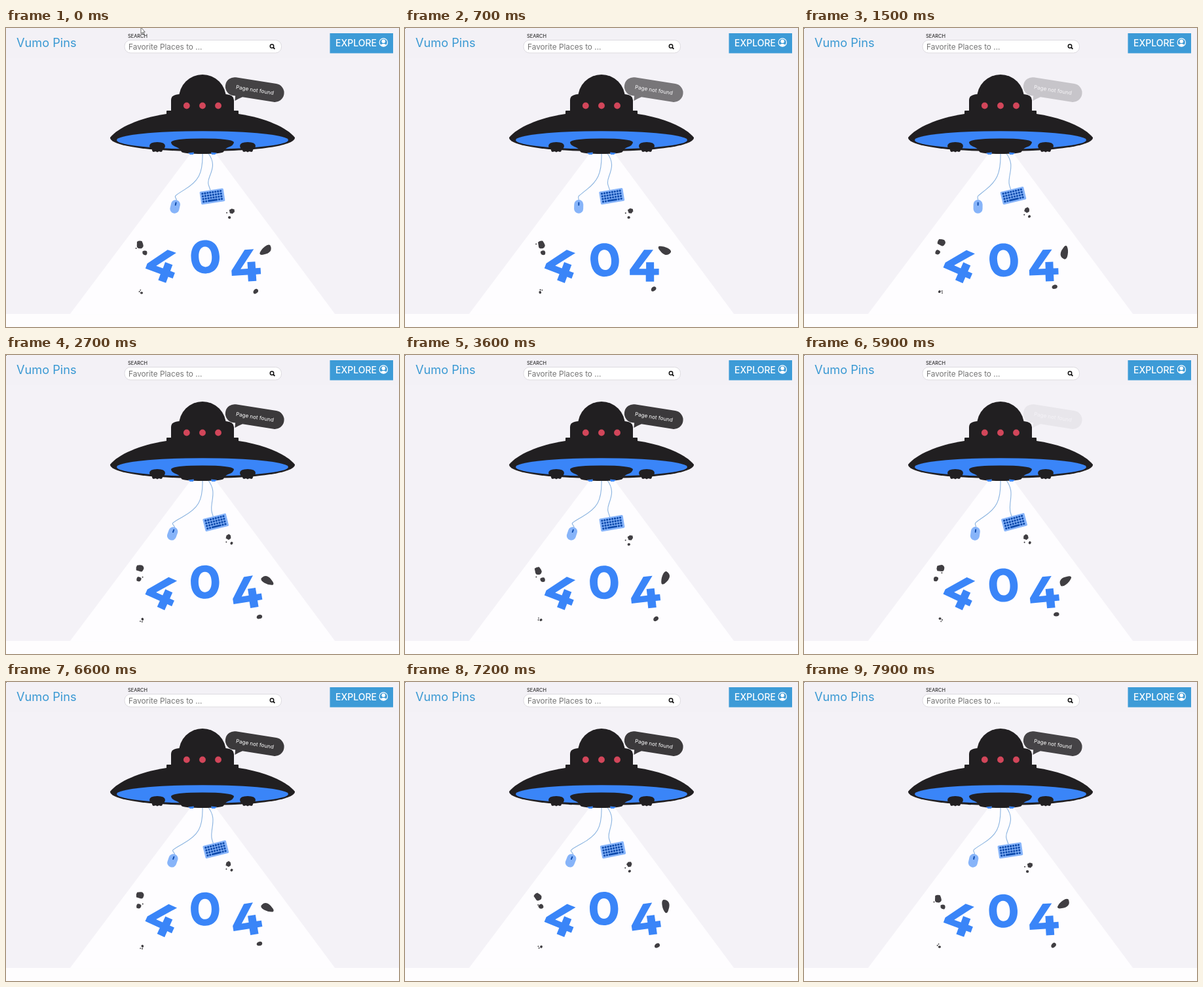
These frames come from a looping animation (600x456 px, 8 s). An HTML page:

```html
<!DOCTYPE html>
<html lang="en">
<head>
<meta charset="utf-8">
<title>Page not found</title>
<style>
  html, body { margin: 0; width: 100%; height: 100%; overflow: hidden; background: #f4f2f7; }
  svg { display: block; width: 600px; height: 456px; }
  text { font-family: Inter, "Open Sans", sans-serif; }
  .ink { fill: #211f21; }
  .blue { fill: #3a85f8; }
  .pale { fill: #87b4f9; }
  .navy { fill: #0f4cae; }
  .rock { fill: #403e42; }
  .cord { fill: none; stroke: #8ab3e0; stroke-width: 1.1; }
</style>
</head>
<body>
<svg viewBox="0 0 600 456">
  <defs>
    <path id="four" d="M-22 14.500V6.500L0 -24H14L-8 5H3V-5H15V5H22.500V14.500H15V24.500H2.500V14.500Z"/>
    <path id="pod" d="M219 180Q219 174 231 174T243 180Q242 185 239 185.500Q239 189 236 189Q234 187.500 231 189.500Q228 187.500 226 189Q223 189 223 185.500Q220 185 219 180Z"/>
  </defs>
  <rect width="600" height="456" fill="#f4f2f7"/>
  <rect width="600" height="45" fill="#f3f1f6"/>
  <rect y="436" width="600" height="20" fill="#fefdfe"/>
  <path d="M283 190H319L502.500 436.500H97.500Z" fill="#fefdff"/>

  <!-- header -->
  <text x="16" y="29" font-size="18.200" fill="#3a99d3">Vumo Pins</text>
  <text x="186" y="14.500" font-size="7.400" fill="#111">SEARCH</text>
  <rect x="181" y="18.500" width="239.500" height="19.500" rx="9" fill="#fff" stroke="#dddbe0"/>
  <text x="187" y="33" font-size="11.800" fill="#757575">Favorite Places to ...</text>
  <g fill="none" stroke="#111" stroke-width="1.500">
    <circle cx="406" cy="27.700" r="2.700"/>
    <path d="M408 29.700L410.300 32" stroke-width="1.900"/>
  </g>
  <rect x="494.500" y="8" width="96.500" height="30.500" fill="#3d9bd7"/>
  <text x="503" y="28" font-size="14" font-weight="500" fill="#fff">EXPLORE</text>
  <circle cx="576.300" cy="22" r="6.200" fill="none" stroke="#fff" stroke-width="1.200"/>
  <circle cx="576.300" cy="20.200" r="2.800" fill="#fff"/>
  <path d="M571.500 26Q576.300 22 581 26Q576.300 30.500 571.500 26Z" fill="#fff"/>

  <!-- cords and ship -->
  <path id="mouseCord" class="cord"/>
  <path id="keyCord" class="cord"/>
  <g id="bubble">
    <g transform="rotate(9 379.500 94)">
      <path d="M348.500 80H411A14 14 0 0 1 411 108H363Q358 111 352.500 115.500L352 108H348.500A14 14 0 0 1 348.500 80Z" fill="#3b393b"/>
      <text x="380" y="97.300" font-size="8.100" fill="#fff" text-anchor="middle">Page not found</text>
    </g>
  </g>
  <g class="ink">
    <path d="M264 110V107A36 36 0 0 1 336 107V110Z"/>
    <path d="M252 130V110Q252 102 264 101H336Q348 102 348 110V130Z"/>
    <rect x="245" y="126" width="110" height="8" rx="1"/>
    <path d="M245 131H355C396 137 429 152 441 167C442 178 395 188 300 188S158 178 159 167C171 152 204 137 245 131Z"/>
  </g>
  <ellipse class="blue" cx="300" cy="171" rx="131" ry="13.800"/>
  <g class="ink">
    <path d="M252 174Q256 168.500 300 168.500T348 174Q348 179 339 182Q334 184 332 189Q328 192 300 192T268 189Q266 184 261 182Q252 179 252 174Z"/>
    <use href="#pod"/>
    <use href="#pod" x="138"/>
  </g>
  <path class="blue" d="M278 190.500L287 189.500L286 193H281ZM322 190.500L313 189.500L314 193H319Z"/>
  <g fill="#d2465a">
    <circle cx="275.800" cy="118.500" r="4.900"/><circle cx="300" cy="118.500" r="4.900"/><circle cx="324" cy="118.500" r="4.900"/>
  </g>

  <g id="mouse">
    <rect class="pale" x="-7" y="-10.300" width="14" height="20.600" rx="6.800"/>
    <rect class="navy" x="-1" y="-7" width="2" height="5.500" rx="1"/>
  </g>
  <g id="keyboard">
    <rect class="pale" x="-18.300" y="-10" width="36.600" height="20" rx="1.800"/>
    <g id="keys" class="navy"></g>
  </g>

  <!-- digits -->
  <use id="fourL" class="blue" href="#four"/>
  <path id="zero" class="blue" fill-rule="evenodd" d="M0 -25.500C14 -25.500 21.700 -15 21.700 0S14 25.500 0 25.500S-21.700 15 -21.700 0S-14 -25.500 0 -25.500ZM0 -15.500C-6 -15.500 -10 -10 -10 0S-6 15.500 0 15.500S10 10 10 0S6 -15.500 0 -15.500Z"/>
  <use id="fourR" class="blue" href="#four"/>

  <!-- debris -->
  <g class="rock">
    <g id="trio">
      <path d="M-1 -6L3 -8L7 -6.500L7 -3L4 0L0 -1Z"/>
      <circle cx="-4.800" cy="-1.800" r="1"/>
      <ellipse cx="-1" cy="5.500" rx="2.200" ry="1.900"/>
    </g>
    <path id="chunk" d="M-4.500 -5Q-1 -7 3 -5.500Q5 -1 5 2Q3 6.500 -1 5.500Q-5 5 -5 2Z"/>
    <path id="pebble" d="M-3.500 -2.500Q0 -4.500 3 -2.500Q4.500 1 2 3.500Q-2 4 -3.500 1Z"/>
    <circle id="speck" r="1"/>
    <path id="shard" d="M-9 5Q-7 -1 -1 -5.500Q4 -9.500 7 -7.500Q10 -2 7 2Q4 5.500 -2 6.500Q-8.500 8.500 -9 5Z"/>
    <path id="stone" d="M-4.200 1Q-4 -2 0 -3Q4 -3.500 4.300 0Q4 3 0 3.300Q-4 4 -4.200 1Z"/>
    <g id="crumbs">
      <ellipse cx="-.3" cy="1" rx="2.100" ry="1.800"/>
      <circle cx="-3.700" cy="-1" r="1"/>
      <circle cx="-2" cy="-3.300" r=".9"/>
    </g>
  </g>

  <path id="arrow" d="M206 -1V8.500L208.200 6.700L209.800 10.300L211.200 9.600L209.700 6.200H212.300Z" fill="#fff" stroke="#444" stroke-width=".8"/>
  <rect id="dot" width="1" height="1" fill="#555"/>
</svg>
<script>
const LOOP = 8000, STEP = 100, PERIOD = 3.93;
const TAU = Math.PI * 2;
const el = {};
document.querySelectorAll('[id]').forEach(n => el[n.id] = n);

function addKey(x, y, width) {
  const key = document.createElementNS('http://www.w3.org/2000/svg', 'rect');
  const box = { x, y, width, height: 2.9, rx: 0.7 };
  for (const name in box) key.setAttribute(name, box[name]);
  el.keys.append(key);
}
for (let row = 0; row < 3; row++)
  for (let col = 0; col < 8; col++) addKey(-15.8 + col * 4, -7.8 + row * 4.1, 3);
addKey(-15.8, 4.5, 3);
addKey(-11.8, 4.5, 3);
addKey(-7.8, 4.5, 15);
addKey(8.2, 4.5, 3);
addKey(12.2, 4.5, 3);

const put = (name, x, y, turn = 0) =>
  el[name].setAttribute('transform', `translate(${x} ${y}) rotate(${turn})`);

// Where a local point lands after rotation about (x, y)
function land(x, y, turn, dx, dy) {
  const a = turn * TAU / 360, c = Math.cos(a), s = Math.sin(a);
  return [x + dx * c - dy * s, y + dx * s + dy * c];
}

// Slow fade out, quick return, hold
function fade(s) {
  if (s > 2.6) s -= PERIOD;
  if (s < -0.4) return 1;
  if (s < 2.4) return (1 + Math.cos((s + 0.4) / 2.8 * Math.PI)) / 2;
  return (s - 2.4) / 0.2;
}

function draw(ms) {
  const s = ms / 1000 % PERIOD;
  const wave = peak => Math.cos(TAU * (s - peak) / PERIOD);
  const spin = 360 * s / PERIOD;
  const bob = wave(1.13), sway = wave(0.22), tilt = wave(0.85);

  const mx = 259.8 + 7 * bob, my = 272.4, mTurn = (266 - mx) * 1.65;
  put('mouse', mx, my, mTurn);
  const [ax, ay] = land(mx, my, mTurn, 0, -10);
  el.mouseCord.setAttribute('d',
    `M300 190C301 223 293 234 ${ax + 12} ${ay - 16}S${ax - 1} ${ay - 7} ${ax} ${ay}`);

  const kx = 318 - 3.2 * sway, ky = 256 + 0.9 * sway, kTurn = -11.8 + 3.4 * sway;
  put('keyboard', kx, ky, kTurn);
  const [bx, by] = land(kx, ky, kTurn, -1.5, -9.5);
  el.keyCord.setAttribute('d',
    `M308 190C319 204 316 214 ${bx * 0.75 + 77} 226S${bx - 2} 240 ${bx} ${by}`);

  put('fourL', 238.5, 360.7, 22.5 - 2.5 * sway);
  put('zero', 304.4 + 0.7 * bob, 350 + 4.7 * bob, -3 - 3 * bob);
  put('fourR', 366 - 0.9 * tilt, 362.2, -4.6 + 4.5 * tilt);

  const roll = -45 + 45 * sway;
  put('trio', 341.3 + 0.7 * sway, 283 + 0.5 * sway, -30 + 30 * sway);
  put('chunk', 206.7 + 3.6 * wave(1.35), 327.8 + 3.4 * wave(0.35), roll);
  put('pebble', 206.7 + 5.6 * sway, 342.3 + 0.7 * sway, roll);
  put('speck', ...land(204.5, 334, spin + 162, 6.2, 0));
  put('shard', 397.7 - 1.7 * wave(0.35), 341.6 - 3.4 * wave(0.35), spin);
  put('stone', ...land(383.2, 398.3, spin + 124, 3.8, 0), -10 - 20 * sway);
  put('crumbs', 207.3, 403, spin);

  el.bubble.setAttribute('opacity', fade(s));
  el.arrow.setAttribute('visibility', ms < STEP ? 'visible' : 'hidden');
  el.dot.setAttribute('visibility', ms < STEP ? 'hidden' : 'visible');
}

const start = performance.now();
function tick() {
  const t = (performance.now() - start) % LOOP;
  draw(Math.floor(t / STEP) * STEP);
  requestAnimationFrame(tick);
}
tick();
</script>
</body>
</html>
```
